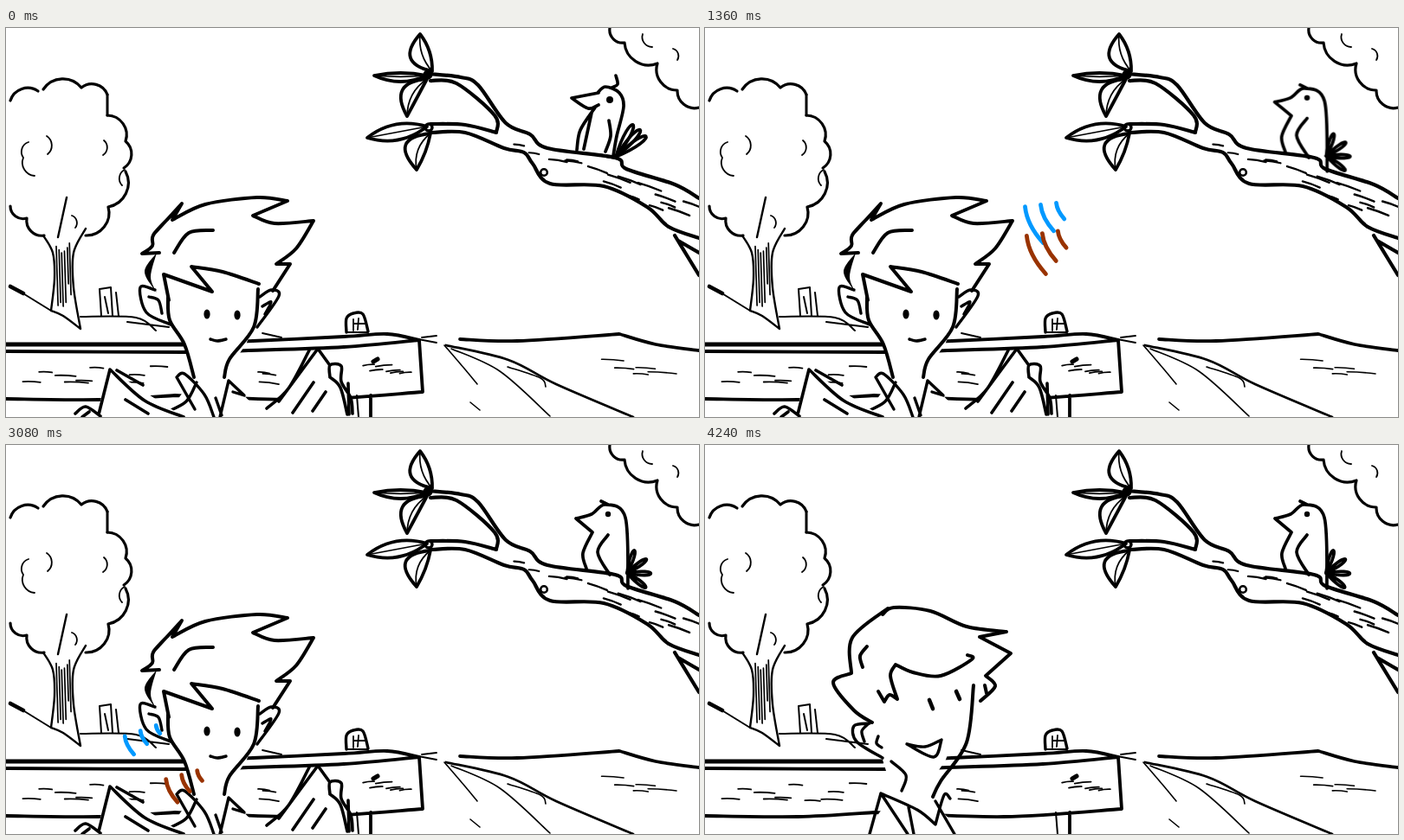
An HTML page that plays this animation: 800x450 px, repeating every 4.8 s.

```html
<!DOCTYPE html>
<html lang="en">
<head>
<meta charset="utf-8">
<title>Bird song</title>
<style>
html, body { margin: 0; width: 100%; height: 100%; overflow: hidden; background: #fff; }
svg { display: block; width: 100vw; height: 100vh; }
.ink { fill: none; stroke: #000; stroke-linecap: round; stroke-linejoin: round; }
.paper { fill: #fff; stroke: none; }
.dot { fill: #000; stroke: none; }

/* Every part shares one 4.8 s loop, drawn on a 40 ms grid. */
.anim { animation: 4.8s linear infinite; }
.swap { animation: 4.8s step-end infinite; }
.late { visibility: hidden; }

#bird { transform-origin: 695px 150px; animation-name: hop; }
@keyframes hop {
  0%, 9.16% { transform: none; animation-timing-function: steps(2); }
  10.83% { transform: scale(.88, 1.18); animation-timing-function: step-end; }
  11.66% { transform: scale(1.05, .94); animation-timing-function: step-end; }
  12.5% { transform: none; animation-timing-function: steps(2); }
  14.16% { transform: scale(.94, 1.17); animation-timing-function: steps(3); }
  16.66% { transform: scale(1.1, .8); animation-timing-function: step-end; }
  17.5% { transform: scale(.92, 1.12); animation-timing-function: steps(4); }
  20.83% { transform: none; animation-timing-function: steps(3); }
  23.33% { transform: scale(.95, 1.06); animation-timing-function: step-end; }
  24.16% { transform: scale(1.05, .94); animation-timing-function: steps(6); }
  29.16%, 100% { transform: none; }
}
#perch { animation-name: perch; }
#reach { animation-name: reach; }
#squat { animation-name: squat; }
#rest { animation-name: rest; }
@keyframes perch { 0% { visibility: visible; } 11.66% { visibility: hidden; } }
@keyframes reach { 11.66% { visibility: visible; } 17.5% { visibility: hidden; } }
@keyframes squat { 17.5% { visibility: visible; } 24.16% { visibility: hidden; } }
@keyframes rest { 24.16%, 100% { visibility: visible; } }

/* A sound is three arcs, each shorter than the one before. */
@property --len { syntax: "<number>"; inherits: true; initial-value: 30; }
@property --rise { syntax: "<number>"; inherits: true; initial-value: 6; }
.sound path {
  fill: none; stroke-width: 4.8; stroke-linecap: round; vector-effect: non-scaling-stroke;
  transform: translate(calc(var(--i) * 18px), calc(var(--i) * var(--rise) * -1px))
             scale(calc(var(--len) * (1 - .28 * var(--i))));
}
#song { animation-name: song; }
#blue { animation-name: blue; stroke: #09f; }
#brown { animation-name: brown; stroke: #930; }
@keyframes song { 16.66% { visibility: visible; } 76.66% { visibility: hidden; } }
@keyframes blue {
  0%, 15.83% { translate: 612px 92px; --len: 8; --rise: 0; animation-timing-function: steps(6); }
  20.83% { translate: 518px 116px; --len: 62; --rise: -3; animation-timing-function: steps(14); }
  32.5% { translate: 287px 257px; --len: 31; --rise: 5; animation-timing-function: steps(7); }
  38.33% { translate: 266px 261px; --len: 31; --rise: 6; animation-timing-function: steps(7); }
  44.16% { translate: 265px 264px; --len: 30; --rise: 6; animation-timing-function: steps(11); }
  53.33% { translate: 167px 317px; --len: 24; --rise: 7; animation-timing-function: steps(17); }
  67.5% { translate: 128px 343px; --len: 20; --rise: 6; animation-timing-function: steps(10); }
  75.83%, 100% { translate: 5px 400px; --len: 18; --rise: 3; }
}
@keyframes brown {
  0%, 15.83% { translate: 612px 98px; --len: 8; --rise: 0; animation-timing-function: steps(6); }
  20.83% { translate: 525px 133px; --len: 66; --rise: -3; animation-timing-function: steps(14); }
  32.5% { translate: 286px 300px; --len: 32; --rise: 6; animation-timing-function: steps(7); }
  38.33% { translate: 290px 308px; --len: 32; --rise: 6; animation-timing-function: steps(7); }
  44.16% { translate: 287px 308px; --len: 31; --rise: 6; animation-timing-function: steps(11); }
  53.33% { translate: 213px 366px; --len: 28; --rise: 5; animation-timing-function: steps(17); }
  67.5% { translate: 176px 393px; --len: 26; --rise: 5; animation-timing-function: steps(10); }
  75.83%, 100% { translate: 20px 428px; --len: 18; --rise: 3; }
}

.bang { fill: none; stroke-linecap: round; }
#shout { animation-name: shout; stroke: #930; stroke-width: 7; --foot: 45%; }
#gasp { animation-name: gasp; stroke: #09f; stroke-width: 4.6; }
#shout .anim { transform-origin: 0 256px; animation-name: shoutBars; }
#gasp .anim { transform-origin: 0 289px; animation-name: gaspBars; }
@keyframes shout { 33.33% { visibility: visible; } 45% { visibility: hidden; } }
@keyframes gasp { 48.33% { visibility: visible; } 61.66% { visibility: hidden; } }
@keyframes shoutBars {
  0%, 32.5% { transform: scaleY(0); animation-timing-function: steps(4); }
  35.83% { transform: scaleY(1.1); animation-timing-function: steps(3); }
  38.33% { transform: none; animation-timing-function: steps(7); }
  44.16%, 100% { transform: scaleY(0); }
}
@keyframes gaspBars {
  0%, 47.5% { transform: scaleY(0); animation-timing-function: steps(4); }
  50.83% { transform: scaleY(1.3); animation-timing-function: steps(3); }
  53.33% { transform: none; animation-timing-function: steps(9); }
  60.83%, 100% { transform: scaleY(0); }
}

#boy { transform-origin: 250px 450px; animation-name: lift; }
#reader { animation-name: reader; }
#smiler { animation-name: smiler; }
#book { animation-name: drop; }
@keyframes lift {
  0%, 76.66% { transform: none; animation-timing-function: steps(3); }
  79.16% { transform: scaleY(1.027); animation-timing-function: steps(3); }
  81.66% { transform: scaleY(.94); animation-timing-function: steps(4); }
  85% { transform: scaleY(1.008); animation-timing-function: steps(4); }
  88.33%, 100% { transform: none; }
}
@keyframes reader { 0% { visibility: visible; } 81.66% { visibility: hidden; } }
@keyframes smiler { 81.66%, 100% { visibility: visible; } }
@keyframes drop {
  0%, 79.16% { transform: none; animation-timing-function: steps(7); }
  85%, 100% { transform: translateY(95px); }
}
</style>
</head>
<body>
<svg viewBox="0 0 800 450" preserveAspectRatio="none">
<g id="scene" class="ink">
  <!-- tree and left bank -->
  <path stroke-width="3.2" data-cw="5,84 37,73 / 43,71 87,69 117,77 / 117,101 138,131 136,162 / 138,166 118,207 92,240 / 44,240 24,220 5,206"/>
  <path stroke-width="3" data-p="117,77 117,101"/>
  <path stroke-width="1.8" data-cw="47,125 48,146 / 113,130 112,147 / 76,217 80,231"/>
  <path stroke-width="1.8" data-ccw="26,132 20,150 33,171 / 137,164 134,182"/>
  <path stroke-width="2.4" data-p="43,240 54,260 56,290 52,327 | 66,333 86,348 | 78,300 78,260 92,232 / 70,196 60,242"/>
  <path stroke-width="4.6" data-p="5,299 20,307"/>
  <path stroke-width="2" data-p="18,306 52,327 / 86,334 150,335 173,350 / 140,340 188,346 / 110,333 108,302 | 121,300 | 123,333 / 127,306 130,333 / 114,311 118,330"/>
  <!-- bench -->
  <path stroke-width="5" data-p="0,366 205,366"/>
  <path stroke-width="3.8" data-p="0,374 205,375 280,373 390,369 477,361 | 481,421 | 345,430 195,425 | 107,430 0,429 / 205,366 285,362 390,357 440,354 477,361 / 421,425 421,450"/>
  <path stroke-width="2" data-p="405,425 407,450"/>
  <path stroke-width="5" data-p="424,386 429,383"/>
  <!-- milestone, horizon and road -->
  <path stroke-width="3.4" data-p="393,352 393,336 401,330 412,331 418,351"/>
  <path stroke-width="1.8" data-p="401,337 401,350 / 401,342 414,342 / 407,336 406,349 / 394,352 418,352 / 296,353 318,358 / 476,360 497,364 / 480,358 497,356"/>
  <path stroke-width="3.8" data-p="524,360 590,362 708,354 | 750,366 800,373"/>
  <path stroke-width="2.8" data-p="508,367 580,384 635,412 724,450"/>
  <path stroke-width="1.6" data-p="506,367 530,395 544,412 / 514,371 570,397 628,449 / 579,392 617,405 623,415 / 536,433 547,442"/>
  <!-- cloud -->
  <path stroke-width="3.2" data-ccw="697,0 714,17 752,41 775,72 800,92"/>
  <path stroke-width="1.8" data-ccw="735,7 746,22"/>
  <path stroke-width="1.8" data-cw="770,24 775,37"/>
  <!-- branch -->
  <path stroke-width="4.2" data-p="488,53 525,57 545,66 577,110 605,123 625,139 703,150 716,163 772,181 800,197 / 490,61 520,64 564,101 566,121 | 530,112 490,111 / 490,121 530,121 575,139 598,144 608,157 628,180 690,183 740,207 765,230 800,243 / 772,240 800,286 / 776,246 800,260"/>
  <circle cx="621" cy="167" r="3.8" stroke-width="2.6"/>
  <circle class="dot" cx="487" cy="54" r="5.5"/>
  <circle cx="488" cy="115" r="4" stroke-width="3.4"/>
</g>

<!-- bird -->
<g id="bird" class="ink anim" stroke-width="3.7">
  <g id="perch" class="swap">
    <path data-p="684,75 | 653,81 | 672,93 684,89 / 683,75 692,68 708,75 713,91 705,125 701,148 / 699,69 706,65 704,55 / 680,92 663,118 659,141 / 676,98 667,140 / 696,107 698,125 692,143 / 686,147 702,150"/>
    <circle class="dot" cx="697" cy="83" r="4"/>
  </g>
  <g id="reach" class="swap late">
    <path data-p="675,77 667,80 | 672,83 | 668,86 | 677,90 675,112 673,142 / 675,77 688,55 696,50 703,60 704,122 708,153 / 696,50 693,40 / 691,114 688,142 / 677,92 680,142"/>
    <circle class="dot" cx="694" cy="66" r="2"/>
  </g>
  <g id="squat" class="swap late">
    <path data-p="661,91 688,71 706,72 728,112 718,168 / 661,91 | 672,96 | 656,125 658,142 / 692,72 685,67 / 683,107 676,124 684,147"/>
    <circle class="dot" cx="691" cy="79" r="2.2"/>
  </g>
  <g id="rest" class="swap late">
    <path data-p="658,85 | 676,80 692,69 715,84 718,166 / 658,85 | 677,101 | 666,125 670,143 / 695,69 687,65 / 695,104 683,124 697,150"/>
    <circle class="dot" cx="695" cy="80" r="3.2"/>
  </g>
</g>

<!-- boy -->
<g id="boy" class="ink anim" stroke-width="4">
  <path class="paper" d="M187 300L205 364 217 403 184 450H300L252 403 278 364 300 300Z"/>
  <g id="reader" class="swap">
    <path data-p="171,238 203,203 | 192,222 | 230,204 290,196 325,200 | 285,217 | 310,226 355,223 | 335,255 312,273 | 328,273 | 308,304 / 200,208 171,238 169,252 157,261 | 177,260 / 194,260 211,237 239,234 / 188,315 182,285 | 238,305 | 214,276 | 250,282 292,296"/>
    <path class="dot" data-p="174,260 160,282 174,306 | 167,288 174,260"/>
    <path data-p="291,302 286,346 258,383 252,404 / 187,312 189,338 206,366 217,404"/>
    <path stroke-width="3.4" data-p="172,303 155,300 162,329 190,343 / 165,311 176,315 180,330 / 293,311 306,303 315,310 290,346 / 296,322 306,317 299,331 / 236,360 244,362 254,360"/>
    <ellipse class="dot" cx="232" cy="331" rx="3.6" ry="5.6"/>
    <ellipse class="dot" cx="267" cy="332" rx="3.6" ry="5.6"/>
    <path stroke-width="3.4" data-p="218,441 197,404 | 206,400 229,424 240,450 / 220,410 208,432 186,444 / 247,450 257,408 | 275,425 | 262,421 / 242,428 249,448"/>
  </g>
  <g id="smiler" class="swap late">
    <path data-p="211,189 170,223 169,264 | 148,275 172,307 193,321 / 205,196 218,188 260,192 302,210 348,216 | 317,222 | 353,241 | 324,267 | 335,279 318,296 / 323,278 325,287 / 187,233 179,244 182,257 / 200,285 207,297 | 213,289 222,294 | 214,267 220,254 | 240,263 272,267 308,248 303,243 / 310,278 302,344 272,389 263,407"/>
    <path stroke-width="3.4" data-p="190,322 172,325 175,343 205,362 / 188,323 181,331 184,343 / 200,337 198,345 204,350 / 215,366 232,382 227,400 / 233,346 254,349 273,341 | 264,361 233,346 / 190,450 203,403 | 245,422 266,439 | 276,405 283,409 / 203,403 234,450 / 235,419 241,450 / 266,412 288,450"/>
    <path stroke-width="4.6" data-p="259,295 263,305 / 290,285 294,294"/>
  </g>
</g>

<!-- book and hands -->
<g id="book" class="ink anim" stroke-width="3.6">
  <path class="paper" d="M120 395L103 450H205ZM360 371L298 450H402L385 388Z"/>
  <path data-p="107,447 120,395 | 160,431 205,450 / 128,396 158,413 / 138,430 164,446 / 80,446 92,438 109,449 / 88,450 96,444"/>
  <path data-p="350,373 326,417 301,440 / 315,432 360,371 | 373,389 / 355,410 331,445 / 369,421 354,443 / 374,404 374,390 387,391 387,409 398,428 400,446 / 374,404 386,416 394,447 / 395,411 396,447"/>
</g>

<!-- sound marks -->
<g id="song" class="swap late"><g id="blue" class="sound anim"></g><g id="brown" class="sound anim"></g></g>
<g id="shout" class="bang swap late">
  <path class="anim" d="M367 213L361 251M383 212L376 251"/>
  <path stroke-width="8.5" d="M355 265h.1M372 265h.1"/>
</g>
<g id="gasp" class="bang swap late">
  <path class="anim" d="M139 265L145 285M148 264L150 286"/>
  <path d="M144 294h.1M152 293h.1"/>
</g>
</svg>
<script>
const get = id => document.getElementById(id);

function draw(parent, d, width) {
  const path = document.createElementNS('http://www.w3.org/2000/svg', 'path');
  path.setAttribute('d', d);
  if (width) path.setAttribute('stroke-width', width);
  return parent.appendChild(path);
}

// "/" starts a new stroke, "|" makes the point before it a sharp corner.
const points = text => text.trim().split(/\s+/).map(p => p.split(',').map(Number));

function curve(pts) {
  return pts.slice(1).map((end, i) => {
    const start = pts[i], before = pts[i - 1] || start, after = pts[i + 2] || end;
    const c1 = start.map((v, k) => v + (end[k] - before[k]) / 6);
    const c2 = end.map((v, k) => v - (after[k] - start[k]) / 6);
    return `C${c1} ${c2} ${end}`;
  }).join('');
}

function stroke(text) {
  let last = null, d = '';
  for (const part of text.split('|')) {
    const pts = points(part);
    if (last) pts.unshift(last); else d = `M${pts[0]}`;
    d += curve(pts);
    last = pts[pts.length - 1];
  }
  return d;
}

// Round lobes between neighbouring points.
const scallops = sweep => text => {
  const pts = points(text);
  return `M${pts[0]}` + pts.slice(1).map((p, i) => {
    const r = Math.hypot(p[0] - pts[i][0], p[1] - pts[i][1]) * .62;
    return `A${r} ${r} 0 0 ${sweep} ${p}`;
  }).join('');
};

for (const [key, shape] of [['p', stroke], ['cw', scallops(1)], ['ccw', scallops(0)]])
  for (const path of document.querySelectorAll(`[data-${key}]`))
    path.setAttribute('d', path.dataset[key].split('/').map(shape).join(''));

let seed = 7;
const random = () => (seed = seed * 16807 % 2147483647) / 2147483647;

// Loose strokes of about (dx, dy), scattered along a line.
function hatch(count, [x0, y0], [x1, y1], spread, dx, dy, width) {
  for (let i = 0; i < count; i++) {
    const f = (i + random()) / count, size = .5 + random() * .6;
    const x = x0 + (x1 - x0) * f, y = y0 + (y1 - y0) * f + (random() * 2 - 1) * spread;
    draw(get('scene'), `M${x} ${y}q${dx * size / 2} ${dy * size / 2 - 1} ${dx * size} ${dy * size}`, width);
  }
}
hatch(6, [58, 256], [74, 256], 8, 2, 65, 1.7);
hatch(10, [8, 397], [175, 400], 14, 26, 1, 1.8);
hatch(3, [288, 400], [298, 402], 10, 25, 3, 1.8);
hatch(6, [410, 393], [455, 393], 16, 18, -2, 1.8);
hatch(5, [684, 384], [754, 405], 6, 30, 2, 1.6);
hatch(5, [575, 131], [665, 162], 4, 20, 3, 2.2);
hatch(11, [672, 166], [785, 212], 11, 25, 9, 2.4);

// Pointed leaf from base to tip, with its own bulge on each side.
function leaf(base, tip, right, left) {
  const dx = tip[0] - base[0], dy = tip[1] - base[1], len = Math.hypot(dx, dy);
  const side = b => [base[0] + dx / 2 + dy / len * b, base[1] + dy / 2 - dx / len * b];
  draw(get('scene'), `M${base}Q${side(right)} ${tip}Q${side(-left)} ${base}`, 3.8);
  draw(get('scene'), `M${base}Q${side((right - left) / 3)} ${tip}`, 1.7);
}
leaf([492, 50], [478, 7], 38, 8);
leaf([486, 55], [425, 55], 14, 6);
leaf([486, 59], [463, 102], 0, 38);
leaf([486, 114], [417, 127], 18, 18);
leaf([490, 122], [474, 164], 4, 44);

// Fan of rounded feathers between two angles in degrees.
function tail(id, x, y, count, from, to, len) {
  for (let i = 0; i < count; i++) {
    const a = (from + (to - from) * i / (count - 1)) * Math.PI / 180;
    const grip = b => `${x + 1.33 * len * Math.cos(a + b)} ${y + 1.33 * len * Math.sin(a + b)}`;
    draw(get(id), `M${x} ${y}C${grip(-.2)} ${grip(.2)} ${x} ${y}`);
  }
}
tail('perch', 704, 149, 3, -62, -34, 43);
tail('reach', 708, 150, 3, -80, -64, 50);
tail('squat', 725, 142, 3, -42, 28, 22);
tail('rest', 717, 148, 4, -72, 38, 28);

for (const id of ['blue', 'brown'])
  for (let i = 0; i < 3; i++)
    draw(get(id), 'M0 0Q.05 .5 .5 1').style.setProperty('--i', i);
</script>
</body>
</html>
```
